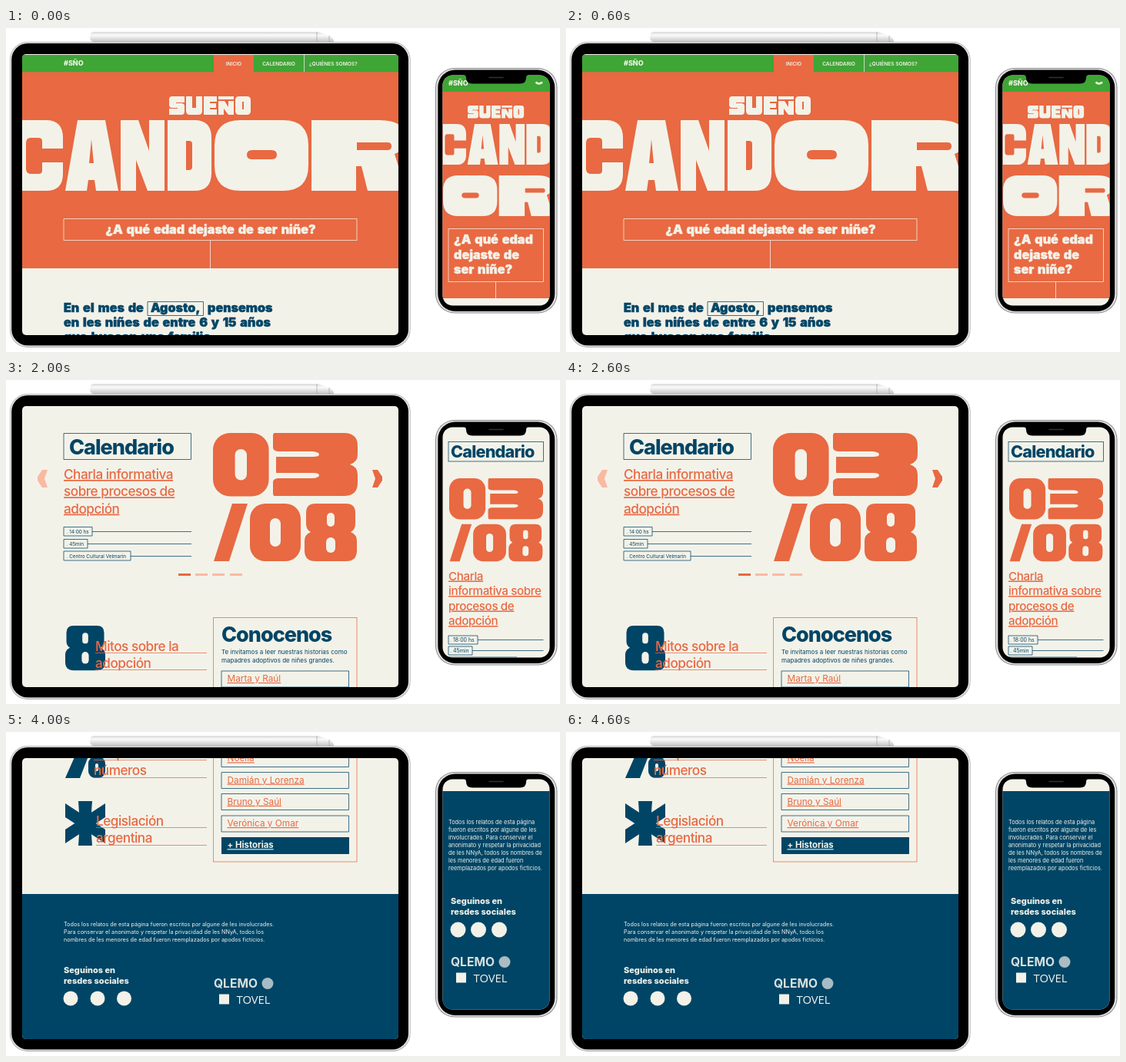
An HTML page for the animation above (5 s loop, 720x422 px).

```html
<!DOCTYPE html>
<html lang="es">
<head>
<meta charset="utf-8">
<title>Sitio adaptable</title>
<style>
:root { --orange: #e86942; --cream: #f3f2e9; --navy: #004566; --green: #3fa535; --pale: #f9b9a3; }
html, body { margin: 0; width: 100%; height: 100%; overflow: hidden; background: #fff; }
svg { display: block; width: 720px; height: 422px; font-family: Inter, "Open Sans", sans-serif; }
text, .under { fill: currentColor; }
.orange { color: var(--orange); }
.cream { color: var(--cream); }
.navy { color: var(--navy); }
.fill { fill: currentColor; }
.line { fill: none; stroke: currentColor; stroke-width: .75; }
.black { font-weight: 900; font-size: 16.1px; word-spacing: 1.6px; stroke: currentColor; stroke-width: .5; }
.title { font-weight: 800; font-size: 27px; letter-spacing: -1px; }
.lead { font-weight: 500; font-size: 17.2px; letter-spacing: -.5px; }
.under { text-decoration: underline 1px; text-underline-offset: 2px; text-decoration-skip-ink: none; }
.copy { font-size: 8px; }
.tag { font-size: 6.4px; }
.nav { font-size: 6.6px; font-weight: 600; }
.bold { font-weight: 800; font-size: 11px; }
.name { font-size: 11.8px; }
.phone .title { font-size: 21.6px; letter-spacing: -.8px; }
.phone .lead { font-size: 15.2px; letter-spacing: -.4px; }
.phone .copy { font-size: 7.35px; }
.scroll { animation: 5s step-end infinite; }
.tablet .scroll { animation-name: tablet; }
.phone .scroll { animation-name: phone; }
@keyframes tablet {
  0% { transform: translateY(0); }
  20% { transform: translateY(-193px); }
  40% { transform: translateY(-482px); }
  60% { transform: translateY(-720px); }
  80%, 100% { transform: translateY(-893px); }
}
@keyframes phone {
  0% { transform: translateY(0); }
  20% { transform: translateY(-300px); }
  40% { transform: translateY(-700px); }
  60% { transform: translateY(-1004px); }
  80%, 100% { transform: translateY(-1404px); }
}
</style>
</head>
<body>
<svg viewBox="0 0 720 422">
<defs>
  <clipPath id="tabletScreen"><rect x="21" y="34" width="489" height="366" rx="5"/></clipPath>
  <clipPath id="phoneScreen"><rect x="567.5" y="61.5" width="139" height="300" rx="13"/></clipPath>
  <linearGradient id="pencil" x2="0" y2="1">
    <stop offset="0" stop-color="#d8d8d8"/><stop offset=".35" stop-color="#fafafa"/><stop offset="1" stop-color="#c4c4c4"/>
  </linearGradient>

  <!-- display lettering -->
  <path id="small" fill-rule="evenodd" d="M4 0H20V8H9V9H16Q20 9 20 13V20Q20 24 16 24H0V16H11V15H4Q0 15 0 11V4Q0 0 4 0Z
    M22 0H30V15H35V0H43V19Q43 24 38 24H27Q22 24 22 19Z M45 0H62V7H53V9H61V15H53V17H62V24H45Z
    M64 0H84V4H64Z M64 6H72L77 14V6H84V24H77L71 16V24H64Z
    M91 0H101Q106 0 106 5V19Q106 24 101 24H91Q86 24 86 19V5Q86 0 91 0ZM95 7V17H97V7Z"/>
  <g id="bigStart" fill-rule="evenodd">
    <path d="M21 120H52Q74 120 74 143V157H47V147Q47 143 42 143H32Q26 143 26 150V183Q26 190 32 190H42Q47 190 47 186V175H74V190Q74 212 52 212H21Z"/>
    <path d="M93 120H129L146 212H117L115 198H107L105 212H77ZM111 145L108 176H114Z"/>
    <path d="M149 120H172L186 160V120H206V212H184L169 172V212H149Z"/>
    <path d="M210 120H245Q267 120 267 143V189Q267 212 245 212H210ZM234 147V185H238Q242 185 242 181V151Q242 147 238 147Z"/>
  </g>
  <g id="bigEnd" fill-rule="evenodd">
    <path d="M305 120H360Q393 120 393 153V179Q393 212 360 212H305Q271 212 271 179V153Q271 120 305 120ZM320 159Q313 159 313 165T320 171H345Q352 171 352 165T345 159Z"/>
    <path d="M397 120H485Q520 120 520 145Q520 158 505 164L520 212H470L462 180H455V212H397ZM456 149V159H496Q501 159 501 154T496 149Z"/>
  </g>

  <!-- figures and symbols -->
  <g id="zero">
    <rect class="fill" width="66" height="75" rx="20"/>
    <rect x="26" y="19" width="14" height="37" rx="7" fill="var(--cream)"/>
  </g>
  <g id="eight">
    <path class="fill" d="M14 0H54Q66 0 66 12V26Q66 34 60 37Q68 40 68 49V61Q68 75 54 75H14Q0 75 0 61V49Q0 40 8 37Q2 34 2 26V12Q2 0 14 0Z"/>
    <rect x="29" y="12" width="10" height="18" rx="5" fill="var(--cream)"/>
    <rect x="28" y="44" width="12" height="20" rx="6" fill="var(--cream)"/>
  </g>
  <path id="three" class="fill" d="M2 0H92Q110 0 110 17V28Q110 38 100 41Q110 44 110 54V65Q110 82 92 82H2Q0 82 0 78V64Q0 60 6 59H52Q60 58 60 55T52 52H4V31H52Q60 31 60 28T52 24H6Q0 23 0 19V4Q0 0 2 0Z"/>
  <g id="date" class="orange">
    <use href="#zero" transform="translate(269 69) scale(1.1)"/>
    <use href="#three" x="347" y="69"/>
    <path class="fill" d="M294 161H314L290 236H270Z"/>
    <use href="#zero" x="317" y="161"/>
    <use href="#eight" x="388" y="161"/>
  </g>
  <use id="myths" href="#eight" transform="scale(.765 .775)"/>
  <g id="percent" class="fill">
    <path d="M26 0H42L19 59H0Z"/>
    <rect y="1" width="22" height="27" rx="9"/>
    <rect x="30" y="31" width="22" height="28" rx="9"/>
    <g fill="var(--cream)"><rect x="9" y="9" width="4" height="10" rx="2"/><rect x="39" y="40" width="4" height="10" rx="2"/></g>
  </g>
  <path id="star" class="fill" d="M17 0H35L33 29L35 58H17L19 29Z M0 3L52 37V55L0 21Z M52 3V21L0 55V37Z"/>
  <path id="arrow" d="M6 0H13L9 11.5L13 23H6L0 14V9Z"/>
</defs>

<rect width="720" height="422" fill="#fff"/>

<!-- tablet body -->
<path d="M114 5H405L420 10Q426 13 426 18H114Q109 18 109 11.5T114 5Z" fill="url(#pencil)"/>
<path d="M404 5V18M420 10V18" stroke="#aaa" stroke-width=".8"/>
<rect x="5" y="18" width="520.5" height="398" rx="23" fill="#a6a6a6"/>
<rect x="5.7" y="18.7" width="519.1" height="396.4" rx="22.3" fill="#e6e6e6"/>
<rect x="7.2" y="20" width="515.8" height="393.5" rx="21"/>

<g class="tablet" clip-path="url(#tabletScreen)">
  <rect x="21" y="34" width="489" height="366" fill="var(--cream)"/>
  <g class="scroll">
    <!-- cover -->
    <g class="cream">
      <rect x="21" y="35" width="489" height="278" fill="var(--orange)"/>
      <path d="M21 35H270V57.3H21ZM322 35H510V57.3H322Z" fill="var(--green)"/>
      <text x="75" y="49" font-size="9" font-weight="800">#SÑO</text>
      <g class="nav">
        <text x="296" y="48.5" text-anchor="middle">INICIO</text>
        <text x="354.5" y="48.5" text-anchor="middle">CALENDARIO</text>
        <text x="394" y="48.5">¿QUIÉNES SOMOS?</text>
      </g>
      <path class="line" d="M387.5 35V57.3M75 248.5H456V276.5H75ZM265.5 276.5V313"/>
      <use class="fill" href="#small" x="212" y="89"/>
      <use class="fill" href="#bigStart"/>
      <use class="fill" href="#bigEnd"/>
      <text class="black" x="266" y="267.5" text-anchor="middle">¿A qué edad dejaste de ser niñe?</text>
    </g>

    <!-- introduction -->
    <g class="navy" transform="translate(0 193)">
      <g class="black">
        <text x="75" y="177.2">En el mes de</text>
        <text x="188" y="177.2">Agosto,</text>
        <text x="262" y="177.2">pensemos</text>
        <text x="75" y="196.3">en les niñes de entre 6 y 15 años</text>
        <text x="75" y="215.4">que buscan una familia</text>
      </g>
      <path class="line" d="M184 163.5H256.5V181.5H184ZM316 264.5H356.5V275.5H316Z"/>
      <text class="copy" y="241">
        <tspan x="75">Somos un grupo de familias autoconvocadas que junto con centros de</tspan>
        <tspan x="75" dy="10.75">adopción organizamos anualmente esta campaña para hablar sobre cómo</tspan>
        <tspan x="75" dy="10.75">es elegir el camino de la adopción en la Argentina.</tspan>
        <tspan x="75" dy="10.75">Con la campaña anual de Sueño Candor buscamos alcanzar más</tspan>
        <tspan x="318">visibilidad</tspan>
        <tspan x="75" dy="10.75">para aportar nuestro granito de arena a la opinión pública compartiendo</tspan>
        <tspan x="75" dy="10.75">nuestras experiencias de personas reales ahijando NNyA con historias y</tspan>
        <tspan x="75" dy="10.75">vidas reales.</tspan>
      </text>
    </g>

    <!-- calendar -->
    <g class="navy" transform="translate(0 482)">
      <path class="line" d="M75 69.5H240.5V103.5H75Z"/>
      <text class="title" x="82" y="96.5">Calendario</text>
      <text class="lead orange under" y="129"><tspan x="75">Charla informativa</tspan><tspan
        x="75" dy="22.3">sobre procesos de</tspan><tspan x="75" dy="22.3">adopción</tspan></text>
      <path class="line" d="M75 191.5H112V203H75ZM112 197.5H241M75 207.5H106V219H75ZM106 213.5H241M75 223H162V235H75ZM162 229.5H241"/>
      <g class="tag">
        <text x="78.5" y="199.5">. 14:00 hs</text>
        <text x="78.5" y="215.5">. 45min</text>
        <text x="78.5" y="231.5">. Centro Cultural Velmarín</text>
      </g>
      <use href="#date"/>
      <use href="#arrow" x="41" y="117" fill="var(--pale)"/>
      <use href="#arrow" transform="translate(489 117) scale(-1 1)" fill="var(--orange)"/>
      <path d="M246 253.5H262M268 253.5H284M291 253.5H307" stroke="var(--pale)" stroke-width="3"/>
      <path d="M224 253.5H240" stroke="var(--orange)" stroke-width="3"/>
    </g>

    <!-- topics and stories -->
    <g class="navy" transform="translate(0 720)">
      <use href="#myths" transform="translate(77 82)"/>
      <use href="#percent" x="77" y="174"/>
      <use href="#star" x="77" y="263"/>
      <g class="orange">
        <path class="line" d="M116 117.5H261M116 139.5H261M114 187.5H261M114 209.5H261M114 232.5H261M117 297.5H261M117 320.5H261"/>
        <g class="lead">
          <text x="116" y="114.5">Mitos sobre la</text>
          <text x="116" y="136.7">adopción</text>
          <text x="114" y="184.7">Estadísticas: la</text>
          <text x="114" y="206.7">adopción en</text>
          <text x="114" y="228.7">números</text>
          <text x="117" y="294.7">Legislación</text>
          <text x="117" y="317">argentina</text>
        </g>
        <rect class="line" x="269.5" y="71.5" width="186.5" height="270.5"/>
      </g>
      <text class="title" x="280" y="103">Conocenos</text>
      <text class="copy" y="119">
        <tspan x="280">Te invitamos a leer nuestras historias como</tspan>
        <tspan x="280" dy="10.7">mapadres adoptivos de niñes grandes.</tspan>
      </text>
      <path class="line" d="M280 141H445.5V162H280ZM280 169H445.5V190H280ZM280 197.5H445.5V218.5H280ZM280 225.5H445.5V246.5H280ZM280 253.5H445.5V274.5H280ZM280 282H445.5V303H280Z"/>
      <g class="name orange under">
        <text x="287.5" y="155">Marta y Raúl</text>
        <text x="287.5" y="183.2">Eva y Norma</text>
        <text x="287.5" y="211.4">Noelia</text>
        <text x="287.5" y="239.6">Damián y Lorenza</text>
        <text x="287.5" y="267.8">Bruno y Saúl</text>
        <text x="287.5" y="296">Verónica y Omar</text>
      </g>
      <rect class="fill" x="280" y="310" width="166" height="22"/>
      <text class="cream under" x="287.5" y="324.3" font-size="11.4" font-weight="700">+ Historias</text>
    </g>

    <!-- footer -->
    <g class="cream" transform="translate(0 893)">
      <rect x="21" y="211" width="489" height="190" fill="var(--navy)"/>
      <text font-size="7.25" y="253.4">
        <tspan x="75">Todos los relatos de esta página fueron escritos por algune de les involucrades.</tspan>
        <tspan x="75" dy="9.9">Para conservar el anonimato y respetar la privacidad de les NNyA, todos los</tspan>
        <tspan x="75" dy="9.9">nombres de les menores de edad fueron reemplazados por apodos ficticios.</tspan>
      </text>
      <text class="bold" y="314"><tspan x="75">Seguinos en</tspan><tspan x="75" dy="13.7">resdes sociales</tspan></text>
      <g class="fill"><circle cx="84" cy="347" r="9.5"/><circle cx="119" cy="347" r="9.5"/><circle cx="153.5" cy="347" r="9.5"/></g>
      <g id="partners">
        <text x="270" y="333.2" font-size="15.6" font-weight="700" color="#d9e0df">QLEMO</text>
        <circle cx="340" cy="327.5" r="7.5" fill="#a9bcc3"/>
        <rect class="fill" x="277" y="341.5" width="13" height="13"/>
        <text x="299.5" y="354" font-size="14.8" font-family="Open Sans, sans-serif">TOVEL</text>
      </g>
    </g>
  </g>
</g>

<!-- phone body -->
<rect x="558" y="52" width="158.5" height="319.5" rx="25" fill="#8c8c8c"/>
<rect x="559" y="53" width="156.5" height="317.5" rx="24" fill="#dedede"/>
<rect x="561.3" y="54.5" width="151.9" height="314.5" rx="22.5"/>

<g class="phone" clip-path="url(#phoneScreen)">
  <rect x="567" y="61" width="140" height="301" fill="var(--cream)"/>
  <g class="scroll">
    <!-- cover -->
    <g class="cream">
      <rect x="567" y="61" width="140" height="291" fill="var(--orange)"/>
      <rect x="567" y="61" width="140" height="22" fill="var(--green)"/>
      <text x="575" y="75" font-size="9" font-weight="800">#SÑO</text>
      <path d="M688.5 70.5Q692.5 74.5 697 70.5" fill="none" stroke="currentColor" stroke-width="2.6"/>
      <use class="fill" href="#small" transform="translate(600 101) scale(.69)"/>
      <use class="fill" href="#bigStart" transform="translate(555.4 56) scale(.576)"/>
      <use class="fill" href="#bigEnd" transform="translate(412 123) scale(.576)"/>
      <path class="line" d="M575 261.5H698.5V330.5H575ZM636.5 330.5V352"/>
      <text class="black" y="281">
        <tspan x="582">¿A qué edad</tspan>
        <tspan x="582" dy="19.5">dejaste de</tspan>
        <tspan x="582" dy="19.5">ser niñe?</tspan>
      </text>
    </g>

    <!-- introduction -->
    <g class="navy" transform="translate(0 300)">
      <text class="black" y="82.5">
        <tspan x="575">En el mes de</tspan>
        <tspan x="580" dy="19.5">Agosto,</tspan>
        <tspan x="575" dy="19.5">pensemos en</tspan>
        <tspan x="575" dy="19.5">les niñes de</tspan>
        <tspan x="575" dy="19.5">entre 6 y 15</tspan>
        <tspan x="575" dy="19.5">años que</tspan>
        <tspan x="575" dy="19.5">buscan una</tspan>
        <tspan x="575" dy="19.5">familia</tspan>
      </text>
      <path class="line" d="M575 87H651V105H575ZM575 325.5H611V336H575Z"/>
      <text class="copy" y="241.7">
        <tspan x="575">Somos un grupo de familias</tspan>
        <tspan x="575" dy="10.15">autoconvocadas que junto con</tspan>
        <tspan x="575" dy="10.15">centros de adopción organizamos</tspan>
        <tspan x="575" dy="10.15">anualmente esta campaña para</tspan>
        <tspan x="575" dy="10.15">hablar sobre cómo es elegir el</tspan>
        <tspan x="575" dy="10.15">camino de la adopción en la</tspan>
        <tspan x="575" dy="10.15">Argentina.</tspan>
        <tspan x="575" dy="10.15">Con la campaña anual de Sueño</tspan>
        <tspan x="575" dy="10.15">Candor buscamos alcanzar más</tspan>
        <tspan x="576" dy="10.15">visibilidad</tspan>
        <tspan x="613.5">para aportar nuestro</tspan>
        <tspan x="575" dy="10.15">granito de arena a la opinión</tspan>
        <tspan x="575" dy="10.15">pública compartiendo nuestras</tspan>
        <tspan x="575" dy="10.15">experiencias de personas reales</tspan>
      </text>
    </g>

    <!-- calendar -->
    <g class="navy" transform="translate(0 700)">
      <rect class="line" x="575" y="80.5" width="123.5" height="25.5"/>
      <text class="title" x="578" y="101">Calendario</text>
      <use href="#date" transform="translate(401.4 83.2) scale(.649)"/>
      <text class="lead orange under" y="260.5"><tspan x="575">Charla</tspan><tspan
        x="575" dy="19.5">informativa sobre</tspan><tspan x="575" dy="19.5">procesos de</tspan><tspan
        x="575" dy="19.5">adopción</tspan></text>
      <path class="line" d="M575 333H613V344H575ZM613 338.5H698.5M575 347H606V358H575ZM606 352.5H698.5M575 361H664V372H575ZM664 366.5H698.5"/>
      <text font-size="7" y="340.8">
        <tspan x="577">. 18:00 hs</tspan>
        <tspan x="577" dy="14">. 45min</tspan>
        <tspan x="577" dy="14">. Centro Cultural Velmarín</tspan>
      </text>
    </g>

    <!-- topics -->
    <g class="navy" transform="translate(0 1004)">
      <use href="#arrow" transform="translate(575 88) scale(.42)" fill="var(--pale)"/>
      <use href="#arrow" transform="translate(698.5 88) scale(-.42 .42)" fill="var(--orange)"/>
      <path d="M625 94H635M639 94H649M653 94H663" stroke="var(--pale)" stroke-width="3"/>
      <path d="M611 94H621" stroke="var(--orange)" stroke-width="3"/>
      <use href="#myths" transform="translate(576 146) scale(.735)"/>
      <use href="#percent" transform="translate(576 223) scale(.735)"/>
      <use href="#star" transform="translate(576 297) scale(.735)"/>
      <g class="orange">
        <path class="line" d="M602 168.5H707M602 188.5H707M600 227.5H707M600 246.5H707M600 266.5H707M603 320.5H707M603 339.5H707"/>
        <g class="lead">
          <text x="602" y="166">Mitos sobre</text>
          <text x="602" y="185.8">la adopción</text>
          <text x="600" y="224.3">Estadísticas:</text>
          <text x="600" y="244">la adopción</text>
          <text x="600" y="263.5">en números</text>
          <text x="603" y="317.3">Legislación</text>
          <text x="603" y="336.8">argentina</text>
        </g>
      </g>
    </g>

    <!-- footer -->
    <g class="cream" transform="translate(0 1404)">
      <rect x="567" y="77" width="140" height="286" fill="var(--navy)"/>
      <text class="copy" y="120">
        <tspan x="575">Todos los relatos de esta página</tspan>
        <tspan x="575" dy="10">fueron escritos por algune de les</tspan>
        <tspan x="575" dy="10">involucrades. Para conservar el</tspan>
        <tspan x="575" dy="10">anonimato y respetar la privacidad</tspan>
        <tspan x="575" dy="10">de les NNyA, todos los nombres de</tspan>
        <tspan x="575" dy="10">les menores de edad fueron</tspan>
        <tspan x="575" dy="10">reemplazados por apodos ficticios.</tspan>
      </text>
      <text class="bold" y="224"><tspan x="578">Seguinos en</tspan><tspan x="578" dy="13.7">resdes sociales</tspan></text>
      <g class="fill"><circle cx="587.5" cy="257.5" r="10"/><circle cx="614" cy="257.5" r="10"/><circle cx="641" cy="257.5" r="10"/></g>
      <use href="#partners" x="308" y="-28"/>
    </g>
  </g>
</g>
<path d="M594 61H680Q676 61 676 65Q676 72.5 668 72.5H606Q598 72.5 598 65Q598 61 594 61Z"/>
<path d="M628 64.5H646" stroke="#333" stroke-width="1.6" stroke-linecap="round"/>
</svg>
</body>
</html>
```
